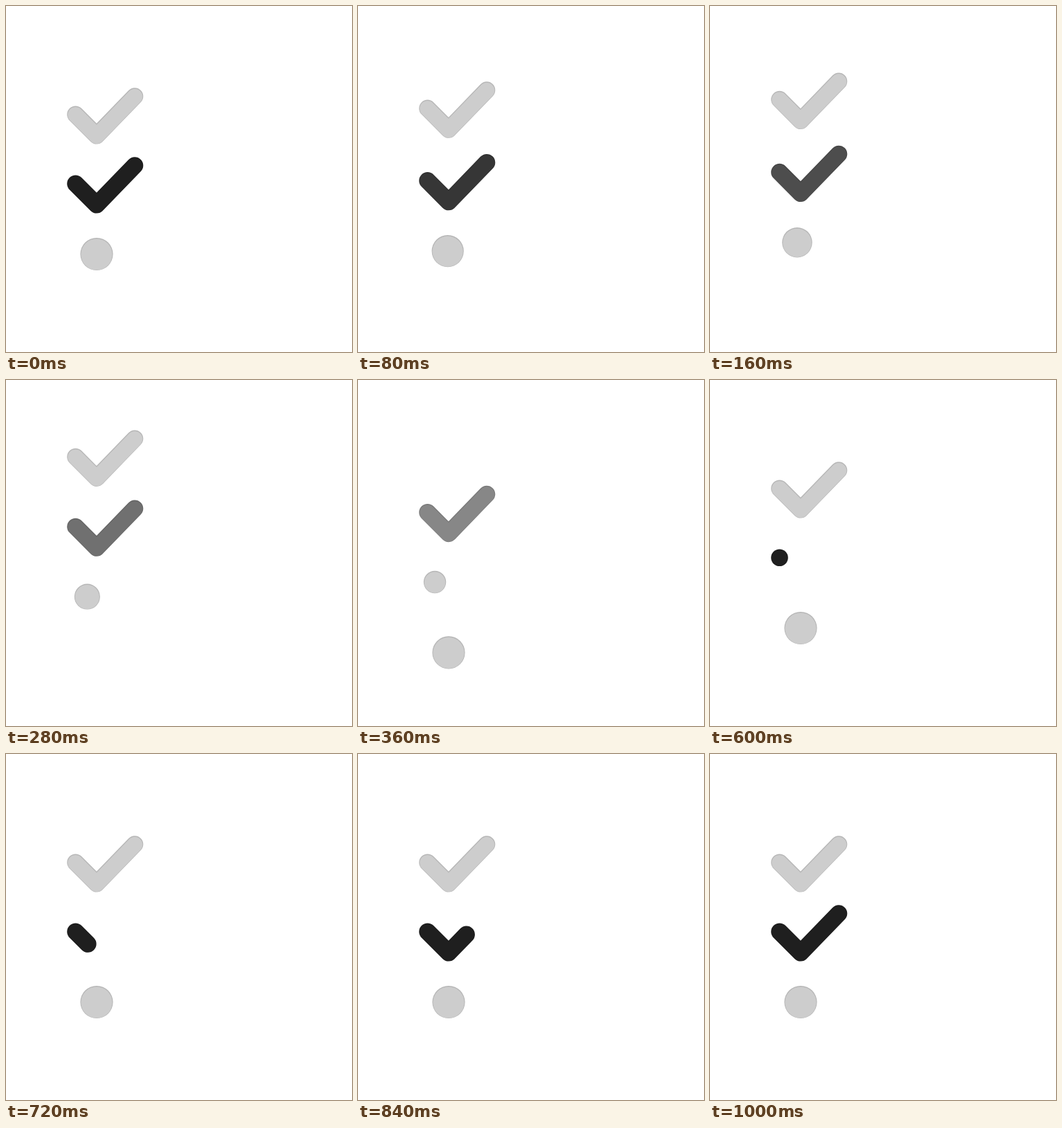
An HTML page for the animation above (1.2 s loop, 500 by 500 pixels).

```html
<!DOCTYPE html>
<html lang="en">
<head>
<meta charset="utf-8">
<title>Checklist loop</title>
<style>
  html, body { margin: 0; width: 100%; height: 100%; overflow: hidden; background: #fff; }
  svg { display: block; width: 100vw; height: 100vh; }
  path { fill: none; stroke-linecap: round; stroke-linejoin: round; }
</style>
</head>
<body>
<svg id="stage" viewBox="0 0 500 500"></svg>
<script>
const stage = document.getElementById('stage');
const LOOP = 1200, STEP = 20, SCROLL = 600, DRAW = 400;
const LIGHT = 205, DARK = 31;
const START = [100.5, 156.7], CORNER = [131, 187.3], END = [186, 130.5];

const mix = (a, b, k) => a + (b - a) * k;
const clamp = k => Math.min(1, Math.max(0, k));
const easeSine = k => (1 - Math.cos(Math.PI * k)) / 2;
const gray = v => `rgb(${Array(3).fill(Math.round(v)).join()})`;
const between = (a, b, k) => [mix(a[0], b[0], k), mix(a[1], b[1], k)];
const dist = (a, b) => Math.hypot(b[0] - a[0], b[1] - a[1]);

// Every mark is a thick round line: a darker rim below a slightly smaller face.
function mark(points, width, shade) {
  const d = 'M' + points.map(p => p.join(' ')).join('L');
  const layer = (w, v, dy) =>
    `<path d="${d}" stroke="${gray(v)}" stroke-width="${w}" transform="translate(0 ${dy})"/>`;
  return layer(width, shade * 0.89, 0) + layer(width - 2, shade, 0.5);
}

const dot = (x, y, r, shade) => mark([[x, y], [x, y]], r * 2, shade);

function check(y, shade, amount = 1) {
  const first = dist(START, CORNER), second = dist(CORNER, END);
  const drawn = amount * (first + second);
  const points = [START, between(START, CORNER, clamp(drawn / first))];
  if (drawn > first) points.push(between(CORNER, END, clamp((drawn - first) / second)));
  return mark(points.map(([px, py]) => [px, py + y]), 24.6, shade);
}

function scrolling(u) {
  const p = easeSine(u);
  let out = check(100 - 100 * p, mix(DARK, LIGHT, u))
    + dot(mix(131, 100.5, p), mix(358.5, 257, p), mix(23.6, 12.3, p), LIGHT);
  // The outgoing row vanishes halfway, where the incoming one appears.
  if (u <= 0.5) out += check(-100 * mix(p, u, 0.5), LIGHT);
  else out += dot(131, 358.5 + 50 * Math.pow(2 * (1 - u), 1.55), 23.6, LIGHT);
  return out;
}

function drawing(k) {
  return check(0, LIGHT) + check(100, DARK, easeSine(k)) + dot(131, 358.5, 23.6, LIGHT);
}

function render(now) {
  const t = Math.floor((now % LOOP) / STEP) * STEP;
  stage.innerHTML = t < SCROLL ? scrolling(t / SCROLL) : drawing(clamp((t - SCROLL) / DRAW));
}

const begin = performance.now();
function tick() {
  render(performance.now() - begin);
  requestAnimationFrame(tick);
}
tick();
</script>
</body>
</html>
```
